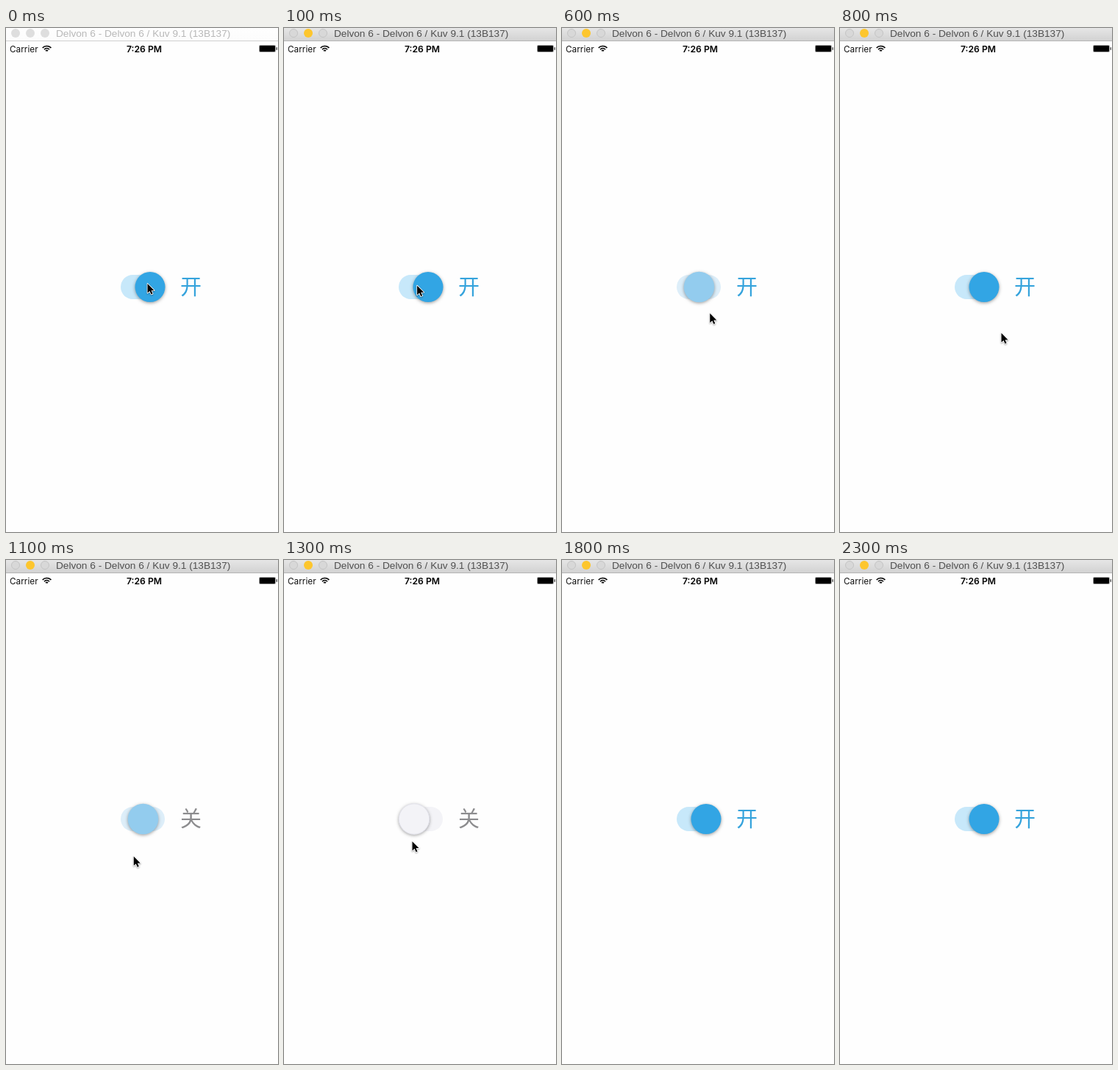
These frames come from a looping animation (370x684 px, 2.4 s). An HTML page with a canvas:

```html
<!DOCTYPE html>
<html lang="en">
<head>
<meta charset="utf-8">
<title>Switch</title>
<style>
html, body { margin: 0; width: 100%; height: 100%; overflow: hidden; background: #fff; }
canvas { display: block; width: 370px; height: 684px; }
</style>
</head>
<body>
<canvas id="stage" width="370" height="684"></canvas>
<script>
const ctx = document.getElementById('stage').getContext('2d');
const LOOP = 2400, STEP = 100, MOVE = 200;

// The switch starts on; every click flips it
const clicks = [200, 500, 1000, 1600];

// Where the pointer pauses: time, x, y
const stops = [
  [0, 192, 346], [400, 166, 352], [500, 178, 353], [800, 219, 413],
  [1000, 186, 354], [1200, 169, 417], [1500, 178, 352], [1600, 178, 352]
];

const lerp = (a, b, p) => a + (b - a) * p;
const easeOut = p => 1 - (1 - p) ** 2;
const mix = (a, b, p) => `rgb(${a.map((v, i) => Math.round(lerp(v, b[i], p)))})`;

const GREY = [243, 243, 247], BLUE = [50, 165, 228];
const TRACK_OFF = [243, 243, 247], TRACK_ON = [199, 232, 250];

function circle(x, y, r, fill, line) {
  ctx.beginPath();
  ctx.arc(x, y, r, 0, Math.PI * 2);
  ctx.fillStyle = fill;
  ctx.fill();
  if (line) {
    ctx.strokeStyle = line;
    ctx.lineWidth = 1;
    ctx.stroke();
  }
}

function pill(x, y, w, h, r, fill) {
  ctx.beginPath();
  ctx.roundRect(x, y, w, h, r);
  ctx.fillStyle = fill;
  ctx.fill();
}

function text(str, x, y, font, fill, align = 'left') {
  ctx.font = font;
  ctx.fillStyle = fill;
  ctx.textAlign = align;
  ctx.fillText(str, x, y);
}

function shadow(color, blur, dy) {
  ctx.shadowColor = color;
  ctx.shadowBlur = blur;
  ctx.shadowOffsetY = dy;
}

function disc(x, y, r, fill, shade) {
  ctx.save();
  shadow(shade, 4, 1.2);
  circle(x, y, r, fill);
  ctx.restore();
}

function titleBar(active) {
  const g = ctx.createLinearGradient(0, 0, 0, 17);
  g.addColorStop(0, active ? '#e6e6e6' : '#fefefe');
  g.addColorStop(1, active ? '#d2d2d2' : '#fcfcfc');
  ctx.fillStyle = g;
  ctx.fillRect(0, 0, 370, 17);
  ctx.fillStyle = active ? '#b4b4b4' : '#d0d0d0';
  ctx.fillRect(0, 17, 370, 1);
  for (const x of [13, 33, 53]) {
    if (!active) circle(x, 7, 6, '#dedede');
    else if (x === 33) circle(x, 7, 6, '#fdc62d');
    else circle(x, 7, 5.5, '#d8d8d8', '#c4c4c4');
  }
  text('Delvon 6 - Delvon 6 / Kuv 9.1 (13B137)', 68, 12,
    '13.65px "Liberation Sans", Arial, sans-serif', active ? '#505050' : '#b8b8b8');
}

function statusBar() {
  text('Carrier', 5, 32.5, '11.8px Inter, sans-serif', '#111');
  text('7:26 PM', 188, 32.5, '600 12.2px Inter, sans-serif', '#000', 'center');
  ctx.strokeStyle = '#000';
  ctx.lineWidth = 1.7;
  for (const r of [2, 4.8, 8]) {
    ctx.beginPath();
    ctx.arc(55.5, 32.5, r, -Math.PI * 0.76, -Math.PI * 0.24);
    ctx.stroke();
  }
  pill(344, 23, 23, 10, 2, '#a4a4a4');
  pill(345, 24, 21, 8, 1, '#000');
  pill(367.5, 26, 1.5, 4, 1, '#555');
}

function toggle(t) {
  const count = clicks.filter(at => at <= t).length;
  const on = count % 2 === 0;
  const age = count ? t - clicks[count - 1] : MOVE;
  const p = Math.min(1, age / MOVE);
  const k = on ? p : 1 - p;
  const x = lerp(177, 196, k), y = 351.5;

  pill(156, 335, 60, 33, 16.5, mix(TRACK_OFF, TRACK_ON, k));
  disc(x, y, lerp(21, 20.5, k), mix(GREY, BLUE, k), 'rgba(0,0,0,.38)');
  if (k < 0.5) circle(x, y, 20.7, mix(GREY, BLUE, k), 'rgba(222,222,232,.8)');

  // Press ripple while turning on
  if (on && age < STEP) {
    circle(181, 355.5, 24.6, '#9295e4');
    disc(x, y, 20.5, '#a8aafe', 'rgba(70,70,150,.4)');
  }
  text(on ? '开' : '关', 251.5, 361.6,
    '300 29px "Noto Sans CJK SC", "Noto Sans CJK", sans-serif',
    on ? '#35a3dc' : '#8c8c8e', 'center');
}

function pointer(t) {
  const i = stops.findIndex(s => s[0] > t);
  const b = i < 0 ? stops[stops.length - 1] : stops[i];
  if (t > b[0]) return;
  const a = i < 0 ? b : stops[i - 1];
  const p = i < 0 ? 1 : easeOut((t - a[0]) / (b[0] - a[0]));
  ctx.save();
  ctx.translate(lerp(a[1], b[1], p) + 0.5, lerp(a[2], b[2], p) + 1);
  ctx.scale(0.84, 0.84);
  ctx.beginPath();
  for (const [x, y] of [[0, 0], [0, 15], [3.6, 11.8], [6, 17.2], [8.4, 16.2], [6, 10.9], [10.8, 10.9]])
    ctx.lineTo(x, y);
  ctx.closePath();
  shadow('rgba(0,0,0,.35)', 2, 1);
  ctx.strokeStyle = '#fff';
  ctx.lineWidth = 2;
  ctx.lineJoin = 'round';
  ctx.stroke();
  shadow('transparent', 0, 0);
  ctx.fillStyle = '#000';
  ctx.fill();
  ctx.restore();
}

function draw(now) {
  const t = Math.floor((now % LOOP) / STEP) * STEP;
  ctx.fillStyle = '#fefefe';
  ctx.fillRect(0, 0, 370, 684);
  titleBar(t >= STEP);
  statusBar();
  toggle(t);
  pointer(t);
}

const start = performance.now();
function tick() {
  draw(performance.now() - start);
  requestAnimationFrame(tick);
}
tick();
</script>
</body>
</html>
```
